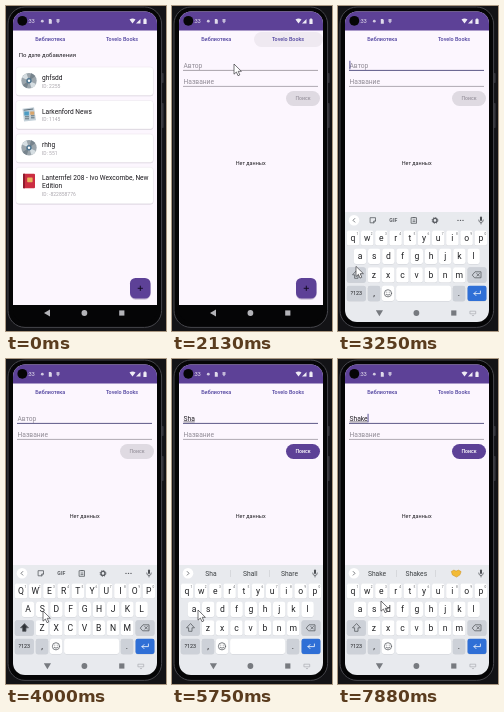
An HTML page for the animation above (8000 ms loop, 160x325 px).

```html
<!DOCTYPE html>
<html lang="ru">
<head>
<meta charset="utf-8">
<title>Библиотека</title>
<style>
  html, body { margin: 0; width: 100%; height: 100%; overflow: hidden; background: #131316; }
  svg { display: block; width: 160px; height: 325px; font-family: Roboto, sans-serif; }
  .tab { font-size: 5.4px; font-weight: 500; fill: #51449f; text-anchor: middle; }
  .title { font-size: 6.6px; fill: #19171c; }
  .id { font-size: 5px; fill: #aaa6ad; }
  .field { font-size: 6.7px; fill: #918c96; }
  .mid { text-anchor: middle; }
  .key { font-size: 8.6px; fill: #202124; text-anchor: middle; }
  .digit { font-size: 3.2px; fill: #63666b; text-anchor: middle; }
  .hint { font-size: 6.7px; fill: #3c4043; text-anchor: middle; }
  .line { fill: none; stroke: #5a5d62; stroke-width: .8; stroke-linejoin: round; stroke-linecap: round; }
</style>
</head>
<body>
<svg viewBox="0 0 160 325">
  <defs>
    <clipPath id="screen"><rect x="7" y="5.5" width="144" height="310.5" rx="12"/></clipPath>
    <g id="disc">
      <circle r="7.7" fill="#9ba5ac"/>
      <path d="M0 0L-7-3.2A7.7 7.7 0 0 1-2.5-7.3ZM0 0L7 3.2A7.7 7.7 0 0 1 2.5 7.3Z" fill="#d6dee2"/>
      <path d="M0 0L2.1-7.4A7.7 7.7 0 0 1 6.3-4.4ZM0 0L-2.1 7.4A7.7 7.7 0 0 1-6.3 4.4Z" fill="#77848d"/>
      <circle r="2.7" fill="#4f7690"/><circle r="1.2" fill="#fff"/>
    </g>
    <g id="paper">
      <path d="M-6.5-5.5L5-7L7 6L-5 7.2Z" fill="#c3d0d8"/>
      <path d="M-5.2-4L4.2-5.2M-4 2.6h4M-4 4.6h4M2 1.6h3.5M2 3.6h3.5" stroke="#5d6f7a" stroke-width="1"/>
      <path d="M-4.7-2.6h4.6v4h-4.6z" fill="#4c9cc4"/>
      <path d="M1.2-2.6h4v3.2h-4z" fill="#d8a56b"/>
    </g>
    <g id="book">
      <rect x="-6" y="-7.3" width="12" height="14.6" rx="1" fill="#cb2d42"/>
      <path d="M-5-7.3V7.3" stroke="#8f1c2e" stroke-width="2"/>
      <rect x="-1.8" y="-3.6" width="5.4" height="4.8" rx=".6" fill="#e6b45c"/>
    </g>
  </defs>

  <rect x="155.6" y="67" width="2" height="10" rx=".8" fill="#35353b"/>
  <rect x="155.6" y="97" width="2" height="25" rx=".8" fill="#35353b"/>
  <rect x="2" y="1" width="153.6" height="320.4" rx="17" fill="#050506" stroke="#46464c"/>
  <g clip-path="url(#screen)">
    <rect x="7" y="5" width="144" height="294" fill="#fcf6fe"/>
    <rect x="7" y="5" width="144" height="19.5" fill="#5d4197"/>
    <circle cx="16.3" cy="14.8" r="4.9" fill="#050506"/>
    <g fill="#fff" opacity=".9">
      <text x="21.5" y="17.2" font-size="5.3">:33</text>
      <circle cx="36.3" cy="15.2" r="1.4" opacity=".8"/>
      <path d="M42.8 13h2l1 1v3.8h-3z" opacity=".9"/>
      <path d="M50.5 13h3v2.6l-1.5 2l-1.5-2z" opacity=".7"/>
      <path d="M123.5 13.6q3-2 6 0l-3 4z"/>
      <path d="M130 17.6l4.5-4.5v4.5z"/>
      <path d="M137.4 13.2h.8v-.6h1.6v.6h.8v4.7h-3.2z"/>
    </g>

    <rect id="ripple" x="82" y="26" width="69" height="15" rx="7.5" fill="#efe9f1"/>
    <text class="tab" x="44.3" y="35.1">Библиотека</text>
    <text class="tab" x="116" y="35.1">Tovelo Books</text>

    <g id="library">
      <text x="12.7" y="50.9" font-size="6" fill="#1d1b20">По дате добавления</text>
    </g>

    <g id="search">
      <text id="label" class="field" x="11.5" y="61.7">Автор</text>
      <text id="typed" class="field" x="11.5" y="61.7" style="fill:#1d1b20"></text>
      <path id="compose" stroke="#1d1b20" stroke-width=".5"/>
      <path id="caret" stroke="#30277a" stroke-width=".8"/>
      <path id="focus" d="M11 64.4H146"/>
      <text class="field" x="11.5" y="78.2">Название</text>
      <path d="M11 80.4H146" stroke="#8f8a93" stroke-width=".7"/>
      <rect id="button" x="114" y="85" width="34" height="15" rx="7.5"/>
      <text id="find" class="mid" x="131" y="94.4" font-size="5.2" font-weight="500">Поиск</text>
      <text class="mid" x="78.7" y="159" font-size="5.4" fill="#1d1b20">Нет данных</text>
    </g>

    <rect x="124" y="273.2" width="20.5" height="20.5" rx="5.5" fill="#b9adc8" opacity=".7"/>
    <rect x="124" y="272" width="20.5" height="20.5" rx="5.5" fill="#5d4197"/>
    <path d="M131.7 282.3h5.2M134.3 279.7v5.2" stroke="#160d29"/>

    <rect x="7" y="299" width="144" height="17" fill="#050506"/>
    <g id="keyboard">
      <rect x="7" y="206" width="144" height="110" fill="#e8eaee"/>
      <circle cx="16" cy="214.3" r="5.3" fill="#fff"/>
      <path id="chevron" class="line"/>
      <g id="tools">
        <path class="line" d="M32.5 211.7h5v3.3l-1.8 1.8h-3.2zM37.5 215h-1.8v1.8"/>
        <text x="55.3" y="216.3" class="mid" font-size="5.2" font-weight="700" fill="#5a5d62">GIF</text>
        <path class="line" d="M73.5 211.7h5v5.6h-5zM75 211.5h2M75 214h2M75 215.6h2"/>
        <circle class="line" cx="97" cy="214.4" r="2" style="stroke-width:1.4"/>
        <circle cx="97" cy="214.4" r="2.9" fill="none" stroke="#5a5d62" stroke-dasharray="1.1 1.18"/>
        <path d="M120 214.4h.01M122.5 214.4h.01M125 214.4h.01" class="line" style="stroke-width:1.4"/>
      </g>
      <g id="hints">
        <path d="M58.5 211v7M97.5 211v7" stroke="#c9ccd1" stroke-width=".6"/>
        <text class="hint" x="39" y="216.6"></text>
        <text class="hint" x="78.3" y="216.6"></text>
        <text class="hint" x="117.5" y="216.6"></text>
        <path id="hands" d="M113.3 212.4l2.6-1.3l2.2 1l2.4-1l2.6 1.5l-1.1 3.2l-3.4 2.3l-4.2-2.2z" fill="#f3bb36" stroke="#c98f22" stroke-width=".5"/>
      </g>
      <path class="line" d="M140.7 214q0 2.5 2.3 2.5t2.3-2.5M143 216.5v1.5"/>
      <path d="M143 211.4v2.6" stroke="#4b4e53" stroke-width="2" stroke-linecap="round"/>
    </g>
    <path id="back"/>
    <g id="nav">
      <circle cx="78.4" cy="307" r="2.9"/>
      <rect x="113.2" y="304.4" width="5.2" height="5.2"/>
    </g>
    <path id="hide" class="line" d="M132.3 305.2h5.4v2.6h-5.4zM134.2 309.3l.8.7l.8-.7" style="stroke:#a9abb0;stroke-width:.7"/>
  </g>
  <path id="mouse" d="M0 0V10.2L2.4 8L4 11.7L5.8 10.9L4.2 7.3H7.4Z" fill="#fff" stroke="#3a3a3e" stroke-width=".7"/>
</svg>
<script>
const $ = id => document.getElementById(id);

function add(parent, tag, attrs, text = '') {
  const el = document.createElementNS('http://www.w3.org/2000/svg', tag);
  for (const name in attrs) el.setAttribute(name, attrs[name]);
  el.textContent = text;
  parent.append(el);
  return el;
}

function card(y, icon, lines, id) {
  const box = $('library'), h = 20.5 + 8 * lines.length;
  add(box, 'rect', { x: 10, y: y + .8, width: 137.3, height: h, rx: 3, fill: '#d5cfd9' });
  add(box, 'rect', { x: 9.8, y, width: 137.6, height: h, rx: 3, fill: '#fff', stroke: '#e8e2eb', 'stroke-width': .5 });
  add(box, 'use', { href: '#' + icon, x: 23, y: y + 13.7 });
  lines.forEach((s, i) => add(box, 'text', { class: 'title', x: 36, y: y + 13.1 + 8 * i }, s));
  add(box, 'text', { class: 'id', x: 36, y: y + 12.6 + 8 * lines.length }, 'ID: ' + id);
}

card(61, 'disc', ['ghfsdd'], 2255);
card(94.5, 'paper', ['Larkenford News'], 1145);
card(128, 'disc', ['rhhg'], 551);
card(161.3, 'book', ['Lanternfel 208 - Ivo Wexcombe, New', 'Edition'], -822858776);

const board = $('keyboard'), step = 14.2, letters = [];

function key(x, y, w, label, fill = '#fff', size = 8.6) {
  add(board, 'rect', { x: x - w / 2, y: y - 7.3, width: w, height: 15.4, rx: 2.2, fill: '#cfd2d7' });
  add(board, 'rect', { x: x - w / 2, y: y - 7.6, width: w, height: 15.2, rx: 2.2, fill });
  return add(board, 'text', { class: 'key', x, y: y + size * .36, style: `font-size:${size}px` }, label);
}

[['qwertyuiop', 15], ['asdfghjkl', 22], ['zxcvbnm', 36]].forEach(([row, x0], r) =>
  [...row].forEach((c, i) => {
    const x = x0 + i * step, y = 232 + r * 18.4;
    letters.push([key(x, y, 12.4, c), c]);
    if (!r) add(board, 'text', { class: 'digit', x: x + 4.5, y: y - 3.3 }, (i + 1) % 10);
  }));

const grey = '#cdd1d8';
key(18.3, 268.8, 19, '', grey);
key(139, 268.8, 19, '', grey);
key(18.3, 287.3, 19, '?123', grey, 5.4);
key(36, 287.3, 12.4, ',', grey);
key(50, 287.3, 12.4, '');
key(85.6, 287.3, 55, '');
key(121, 287.3, 12.4, '.', grey);
key(139, 287.3, 19, '', '#2f6fd6');
const shift = add(board, 'path', { class: 'line', d: 'M18.3 264.8L14.5 268.8H16.6V272.3H20V268.8H22.1Z' });
add(board, 'path', { class: 'line', d: 'M134.5 268.8L137 265.8H143V271.8H137ZM138.8 267.5l2.6 2.6m0-2.6l-2.6 2.6' });
add(board, 'circle', { class: 'line', cx: 50, cy: 287.3, r: 3.6 });
add(board, 'path', { class: 'line', d: 'M48.3 288.4q1.7 1.8 3.4 0M48.8 286.2h.01M51.2 286.2h.01' });
add(board, 'path', { class: 'line', d: 'M142.4 285v2.6H136m2-2l-2 2l2 2', style: 'stroke:#fff' });

// time, x, y of the pointer
const path = [
  [880, 162, 150], [1480, 117, 33], [1700, 117, 33], [2100, 62, 58], [2750, 62, 58],
  [3300, 17, 265], [3480, 17, 265], [3900, 37, 252], [4230, 37, 252], [4580, 85, 251],
  [4760, 85, 251], [5000, 26, 251], [5750, 26, 251], [6400, 121, 251], [6700, 121, 251],
  [7350, 43, 234], [7550, 43, 234], [7850, 43, 242], [8000, 43, 242]
];
// time, typed text, suggestions
const strokes = [
  [2250, ''],
  [4200, 'S', 'S', 'So', 'She'],
  [4750, 'Sh', 'Sh', 'She', 'Should'],
  [5250, 'Sha', 'Sha', 'Shall', 'Share'],
  [6500, 'Shak', 'Shak', 'Shake', ''],
  [7500, 'Shake', 'Shake', 'Shakes', '']
];
const hints = $('hints').querySelectorAll('text');
const clamp = v => Math.max(0, Math.min(1, v));
const ease = v => v * v * (3 - 2 * v);
const ramp = (t, a, b) => ease(clamp((t - a) / (b - a)));
const set = (id, attrs) => { for (const k in attrs) $(id).setAttribute(k, attrs[k]); };
const show = (id, on) => set(id, { visibility: on ? 'visible' : 'hidden' });

function movePointer(t) {
  const i = path.findIndex(p => p[0] > t);
  show('mouse', i > 0);
  if (i < 1) return;
  const [a, x, y] = path[i - 1], [b, x2, y2] = path[i], k = ramp(t, a, b);
  set('mouse', { transform: `translate(${x + (x2 - x) * k} ${y + (y2 - y) * k})` });
}

function type(t) {
  const [since, text, ...words] = strokes.filter(s => s[0] <= t).pop() || [0, ''];
  const focused = since > 0;
  $('typed').textContent = text;
  const end = 11.5 + (text ? $('typed').getComputedTextLength() : 0);
  show('label', !text);
  set('compose', { d: text ? `M11.5 62.9H${end}` : '' });
  set('caret', { d: focused && (t - since) % 1000 < 500 ? `M${end + .4} 54.8V63.3` : '' });
  set('focus', { stroke: focused ? '#5c5988' : '#858089', 'stroke-width': focused ? 1 : .7 });
  const ready = text.length > 2;
  set('button', { fill: ready ? '#5d4197' : '#dfdae2' });
  set('find', { fill: ready ? '#fff' : '#9d98a2' });
  show('tools', !text);
  show('hints', text);
  $('hands').style.display = ready && !words[2] ? '' : 'none';
  hints.forEach((el, i) => {
    el.textContent = words[i] || '';
    el.style.fontWeight = i === 1 && text === 'Shak' ? 700 : 400;
  });
  set('chevron', { d: text ? 'M15.2 212.5l1.8 1.8l-1.8 1.8' : 'M16.8 212.5l-1.8 1.8l1.8 1.8' });
}

function frame(now) {
  const t = now % 8000, up = ramp(t, 2350, 2600), open = t >= 2350;
  const page = ramp(t, 1720, 1850);
  set('library', { opacity: 1 - page });
  set('search', { opacity: page });
  set('ripple', { opacity: ramp(t, 1560, 1750) * (1 - ramp(t, 2150, 2450)) });
  set('keyboard', { transform: `translate(0 ${110 * (1 - up)})` });
  $('keyboard').style.display = open ? '' : 'none';
  const light = up > .3, tint = light ? '#777a7f' : '#b4b4b8';
  set('nav', { fill: tint });
  set('back', { fill: tint, d: light ? 'M37.8 304.3H45L41.4 310.2Z' : 'M44 303.6V310.4L38 307Z' });
  show('hide', light);
  const caps = t >= 3450 && t < 4200;
  letters.forEach(([el, c]) => el.textContent = caps ? c.toUpperCase() : c);
  shift.style.fill = caps ? '#303338' : 'none';
  type(t);
  movePointer(t);
  requestAnimationFrame(() => frame(performance.now()));
}
frame(performance.now());
</script>
</body>
</html>
```
